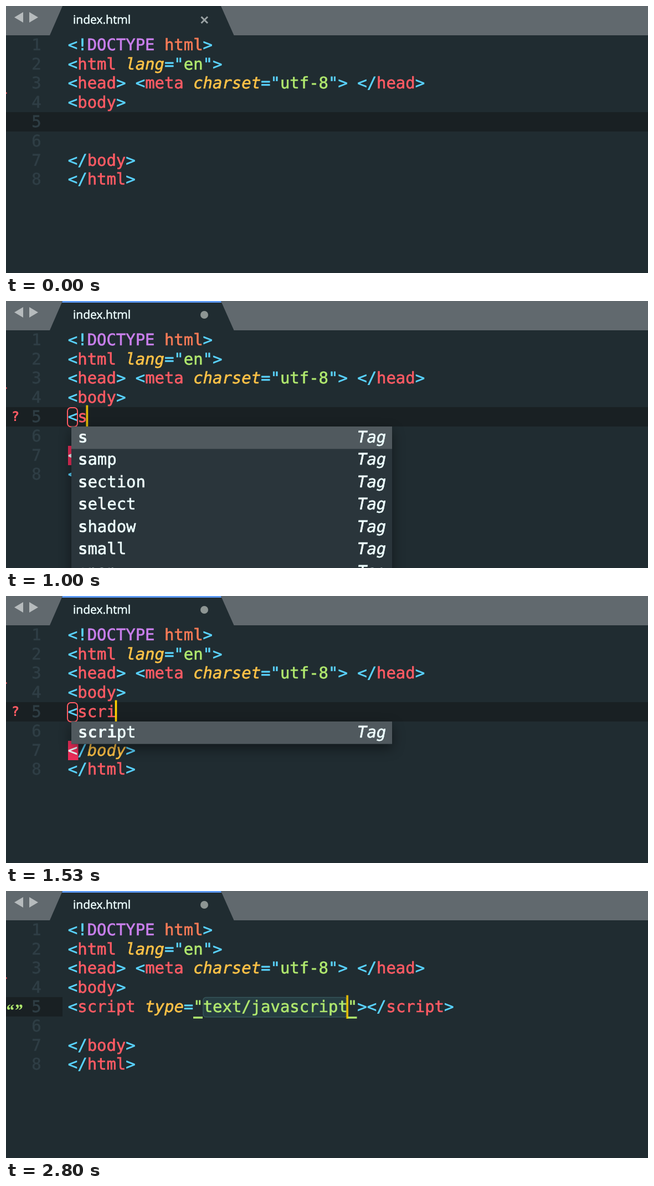
An HTML page for the animation above (2870 ms loop, 1159 by 483 pixels).

```html
<!DOCTYPE html>
<html lang="en">
<head>
<meta charset="utf-8">
<title>Tag completion in a code editor</title>
<style>
html, body { margin: 0; width: 100%; height: 100%; overflow: hidden; background: #202c31; }
svg { display: block; width: 1159px; height: 483px; }
text {
  font: 28.93px "DejaVu Sans Mono", monospace;
  white-space: pre;
  text-rendering: geometricPrecision;
  stroke-width: .65px;
}
.c { fill: #5ad4ff; stroke: #5ad4ff; }
.r { fill: #ff5b64; stroke: #ff5b64; }
.p { fill: #c97fec; stroke: #c97fec; }
.o { fill: #fa7b57; stroke: #fa7b57; }
.g { fill: #b0e86e; stroke: #b0e86e; }
.w { fill: #eeffff; stroke: #eeffff; }
.y { fill: #ffc247; stroke: #ffc247; font-style: italic; }
.n { fill: #2f3e45; stroke: #2f3e45; }
.b { font-weight: bold; stroke: none; }
.i { font-style: italic; }
.tab { font: 21px "Open Sans", "Noto Sans", sans-serif; stroke-width: .5px; }
.ask { font: bold 24px "DejaVu Sans Mono", monospace; stroke: none; }
.quo { font: italic bold 31px "Liberation Serif", serif; stroke: none; }
.menu { filter: drop-shadow(0 8px 11px rgba(0, 0, 0, .45)); }

[class*="t-"], #caret { animation: 2870ms step-end infinite; }
.t-clean { animation-name: clean; }
.t-dirty { animation-name: dirty; }
.t-open { animation-name: open; }
.t-s { animation-name: keyS; }
.t-c { animation-name: keyC; }
.t-r { animation-name: keyR; }
.t-i { animation-name: keyI; }
.t-done { animation-name: done; }
.t-undone { animation-name: undone; }
.t-bad { animation-name: bad; }
.t-good { animation-name: good; }
.t-mark { animation-name: mark; }
.t-menu1 { animation-name: menu1; }
.t-menu2 { animation-name: menu2; }
.t-menu3 { animation-name: menu3; }
.t-menu4 { animation-name: menu4; }
#caret { animation-name: caret; }

@keyframes clean  { 0% { visibility: visible } 18.467%, 100% { visibility: hidden } }
@keyframes dirty  { 0% { visibility: hidden } 18.467%, 100% { visibility: visible } }
@keyframes open   { 0% { visibility: hidden } 18.467% { visibility: visible } 23.344%, 100% { visibility: hidden } }
@keyframes keyS   { 0% { visibility: hidden } 23.344%, 100% { visibility: visible } }
@keyframes keyC   { 0% { visibility: hidden } 41.811%, 100% { visibility: visible } }
@keyframes keyR   { 0% { visibility: hidden } 48.78%, 100% { visibility: visible } }
@keyframes keyI   { 0% { visibility: hidden } 53.31%, 100% { visibility: visible } }
@keyframes done   { 0% { visibility: hidden } 58.188%, 100% { visibility: visible } }
@keyframes undone { 0% { visibility: visible } 58.188%, 100% { visibility: hidden } }
@keyframes bad    { 0% { visibility: hidden } 23.344% { visibility: visible } 58.188%, 100% { visibility: hidden } }
@keyframes good   { 0% { visibility: visible } 23.344% { visibility: hidden } 58.188%, 100% { visibility: visible } }
@keyframes mark   { 0% { visibility: hidden } 27.874% { visibility: visible } 58.188%, 100% { visibility: hidden } }
@keyframes menu1  { 0% { visibility: hidden } 25.783% { visibility: visible } 41.811%, 100% { visibility: hidden } }
@keyframes menu2  { 0% { visibility: hidden } 41.811% { visibility: visible } 48.78%, 100% { visibility: hidden } }
@keyframes menu3  { 0% { visibility: hidden } 48.78% { visibility: visible } 53.31%, 100% { visibility: hidden } }
@keyframes menu4  { 0% { visibility: hidden } 53.31% { visibility: visible } 67.247%, 100% { visibility: hidden } }
@keyframes caret {
  0%      { transform: translateX(0); opacity: 0 }
  2.439%  { transform: translateX(0); opacity: .25 }
  4.878%  { transform: translateX(0); opacity: .55 }
  6.968%  { transform: translateX(0); opacity: .8 }
  9.407%  { transform: translateX(0); opacity: 1 }
  18.467% { transform: translateX(17.4px); opacity: 1 }
  23.344% { transform: translateX(34.8px); opacity: 1 }
  34.843% { transform: translateX(34.8px); opacity: .9 }
  37.282% { transform: translateX(34.8px); opacity: .6 }
  41.811% { transform: translateX(52.2px); opacity: 1 }
  48.78%  { transform: translateX(69.6px); opacity: 1 }
  53.31%  { transform: translateX(87px); opacity: 1 }
  58.188% { transform: translateX(504.6px); opacity: 1 }
  69.686% { transform: translateX(504.6px); opacity: .9 }
  72.125% { transform: translateX(504.6px); opacity: .6 }
  74.216% { transform: translateX(504.6px); opacity: .25 }
  76.655% { transform: translateX(504.6px); opacity: 0 }
  90.592% { transform: translateX(504.6px); opacity: .25 }
  93.031% { transform: translateX(504.6px); opacity: .5 }
  95.121% { transform: translateX(504.6px); opacity: .75 }
  97.56%, 100% { transform: translateX(504.6px); opacity: .92 }
}
</style>
</head>
<body>
<svg viewBox="0 0 1159 483">
  <rect width="1159" height="483" fill="#202c31"/>

  <!-- tab bar -->
  <rect width="1159" height="53" fill="#61696e"/>
  <path d="M15 20.5 31 11V30ZM58 20.5 42 11V30Z" fill="#b6bbbd"/>
  <path d="M79 53 102 0H388L411.5 53Z" fill="#202c31"/>
  <text class="tab w" x="121" y="32">index.html</text>
  <path class="t-clean" d="M352.5 19.5 364 31M364 19.5 352.5 31" stroke="#9aa2a4" stroke-width="3"/>
  <g class="t-dirty">
    <path d="M102 0H388L389 3H101Z" fill="#5f9bf7"/>
    <circle cx="358" cy="25" r="7" fill="#8d9593"/>
  </g>

  <!-- current line and gutter -->
  <rect class="t-undone" y="192" width="1159" height="35" fill="#192023"/>
  <rect class="t-done" y="192" width="102" height="35" fill="#192023"/>
  <rect y="156" width="1.5" height="3" fill="#e8505a"/>
  <g id="nums"></g>
  <text class="ask r t-mark" x="9.8" y="217">?</text>
  <text class="quo g t-done" x="-1" y="225.5">“”</text>

  <!-- code -->
  <text x="111.8" y="79.8"><tspan class="c">&lt;!</tspan><tspan class="p">DOCTYPE</tspan> <tspan class="o">html</tspan><tspan class="c">&gt;</tspan></text>
  <text x="111.8" y="114.6"><tspan class="c">&lt;</tspan><tspan class="r">html</tspan> <tspan class="y">lang</tspan><tspan class="c">="</tspan><tspan class="g">en</tspan><tspan class="c">"&gt;</tspan></text>
  <text x="111.8" y="149.4"><tspan class="c">&lt;</tspan><tspan class="r">head</tspan><tspan class="c">&gt; &lt;</tspan><tspan class="r">meta</tspan> <tspan class="y">charset</tspan><tspan class="c">="</tspan><tspan class="g">utf-8</tspan><tspan class="c">"&gt; &lt;/</tspan><tspan class="r">head</tspan><tspan class="c">&gt;</tspan></text>
  <text x="111.8" y="184.2"><tspan class="c">&lt;</tspan><tspan class="r">body</tspan><tspan class="c">&gt;</tspan></text>

  <g class="t-done">
    <rect x="356" y="192.5" width="260" height="35.5" rx="5" fill="#263d42" stroke="#36555a" stroke-width="1.5"/>
    <path d="M338 229H355M616.5 229H633.5" stroke="#b0e86e" stroke-width="3.5"/>
  </g>
  <text class="w t-open" x="111.8" y="219">&lt;</text>
  <text x="111.8" y="219"><tspan class="c t-s">&lt;</tspan><tspan class="r t-s">s</tspan><tspan class="r t-c">c</tspan><tspan class="r t-r">r</tspan><tspan class="r t-i">i</tspan><tspan class="r t-done">pt</tspan> <tspan class="y t-done">type</tspan><tspan class="c t-done">=</tspan><tspan class="g t-done">"text/javascript"</tspan><tspan class="c t-done">&gt;&lt;/</tspan><tspan class="r t-done">script</tspan><tspan class="c t-done">&gt;</tspan></text>
  <rect class="t-mark" x="111" y="193" width="18" height="34.5" rx="6" fill="none" stroke="#ff5b64" stroke-width="2"/>

  <text class="t-good" x="111.8" y="288.6"><tspan class="c">&lt;/</tspan><tspan class="r">body</tspan><tspan class="c">&gt;</tspan></text>
  <g class="t-bad">
    <rect x="112" y="262" width="18.5" height="35" fill="#ec2d5a"/>
    <text x="111.8" y="288.6"><tspan class="w">&lt;</tspan><tspan class="c">/</tspan><tspan class="y">body</tspan><tspan class="c">&gt;</tspan></text>
  </g>
  <text x="111.8" y="323.4"><tspan class="c">&lt;/</tspan><tspan class="r">html</tspan><tspan class="c">&gt;</tspan></text>

  <rect id="caret" x="109.7" y="188.5" width="3.6" height="42.5" fill="#ffd000"/>
  <g id="menus"></g>
</svg>
<script>
const byId = id => document.getElementById(id);

byId('nums').innerHTML = [...'12345678'].map((d, k) =>
  `<text class="n" x="46.3" y="${79.8 + k * 34.8}">${d}</text>`).join('');

// Bold the typed letters in the order they occur in the word.
function matched(word, typed) {
  let k = 0;
  return [...word].map(ch =>
    ch === typed[k] ? (k++, `<tspan class="b">${ch}</tspan>`) : ch).join('');
}

function menu(name, typed, words, rows = words.length) {
  const step = 40.55;
  const lines = words.map((word, k) => {
    const y = 255.7 + k * step;
    return `<text class="w" x="130" y="${y}">${matched(word, typed)}</text>
      <text class="w i" x="634" y="${y}">Tag</text>`;
  }).join('');
  return `<g class="t-${name}">
    <rect class="menu" x="118" y="227" width="579" height="${rows * step}" fill="#2a353b"/>
    <rect x="118" y="227" width="579" height="${step}" fill="#50595e"/>${lines}</g>`;
}

byId('menus').innerHTML =
  menu('menu1', 's', ['s', 'samp', 'section', 'select', 'shadow', 'small', 'span'], 8) +
  menu('menu2', 'sc', ['script', 'section', 'select', 'source']) +
  menu('menu3', 'scr', ['script']) +
  menu('menu4', 'scri', ['script']);
</script>
</body>
</html>
```
